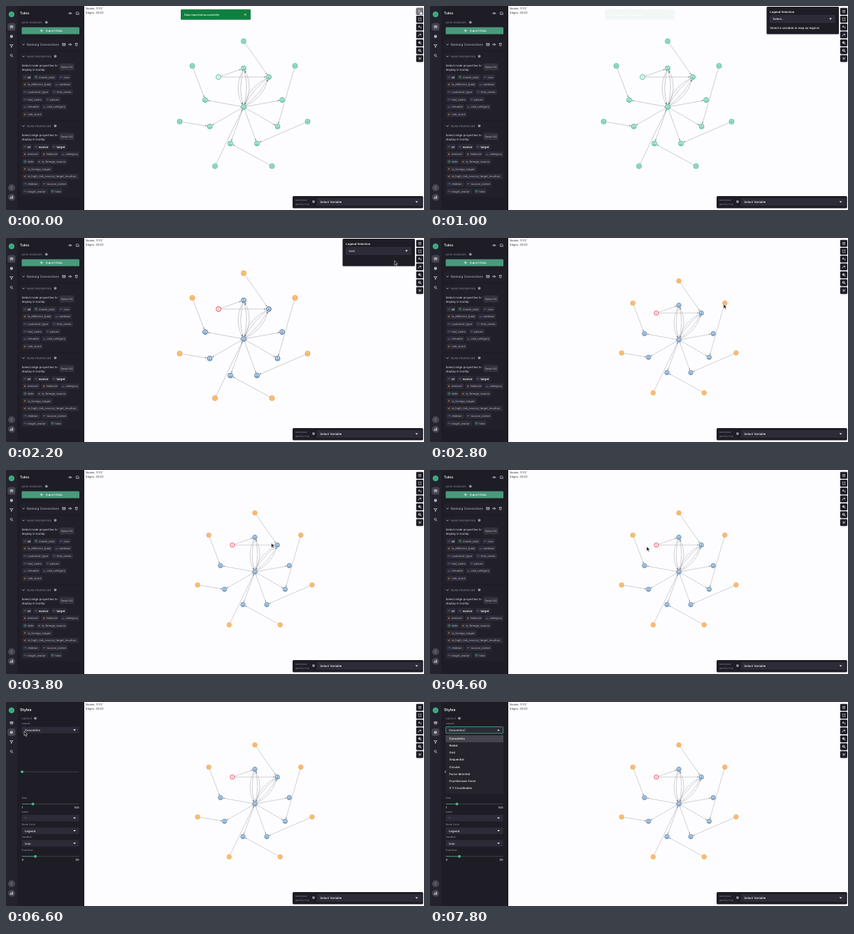
Write an HTML page that moves like this. It is 598x293 px and loops after 8000 ms.

```html
<!DOCTYPE html>
<html lang="en">
<head>
<meta charset="utf-8">
<title>Graph explorer</title>
<style>
html, body { margin: 0; width: 100%; height: 100%; overflow: hidden; background: #fdfdff; }
svg { display: block; width: 100vw; height: 100vh; }
text { font-family: Inter, "Open Sans", sans-serif; font-weight: 500; text-rendering: geometricPrecision; white-space: pre; }
#legendMenu { filter: drop-shadow(0 1px 2px #0006); }
.green { --in: #b3e6d6; --out: #b3e6d6; --red: #f4fcf9; --inS: #56bb9a; --outS: #56bb9a; --redS: #56bb9a; }
.mapped { --in: #b4d0ea; --out: #fcd09a; --red: #fdeef0; --inS: #5a81a8; --outS: #ec9c40; --redS: #e84d62; }
</style>
</head>
<body>
<svg id="stage" viewBox="0 0 598 293" preserveAspectRatio="none"></svg>
<script>
const C = {
  page: '#fdfdff', rail: '#24222c', panel: '#1e1c24', card: '#211f28', field: '#2d2b37', menu: '#25232c',
  hover: '#46444d', line: '#3a3843', tag: '#2d2b36', dim: '#8d8b95', soft: '#c4c2ca',
  white: '#f4f4f6', green: '#4a997d', blue: '#5286d8', orange: '#dd8f3b', clock: '#4bb08a'
};

// Drawing helpers
const rect = (x, y, w, h, fill, r = 1, extra = '') =>
  `<rect x="${x}" y="${y}" width="${w}" height="${h}" rx="${r}" fill="${fill}" ${extra}/>`;
const text = (x, y, s, size = 4.2, fill = C.soft, extra = '') =>
  `<text x="${x}" y="${y + size * 0.36}" font-size="${size}" fill="${fill}" ${extra}>${s}</text>`;
const path = (d, color = C.soft, w = 0.7, extra = '') =>
  `<path d="${d}" fill="none" stroke="${color}" stroke-width="${w}" stroke-linecap="round" stroke-linejoin="round" ${extra}/>`;
const disc = (x, y, r, fill, extra = '') => `<circle cx="${x}" cy="${y}" r="${r}" fill="${fill}" ${extra}/>`;
const group = (id, body, extra = '') => `<g id="${id}" ${extra}>${body}</g>`;
const at = (x, y, body) => `<g transform="translate(${x} ${y})">${body}</g>`;
const bold = 'font-weight="600" style="font-weight:600"';
const chevron = (x, y) => path(`M${x - 1.4} ${y - 0.7}l1.4 1.4 1.4 -1.4`, C.soft, 0.8);
const caret = (x, y, up = 1) => `<path d="M${x - 1.9} ${y - 1 * up}h3.8l-1.9 ${2.1 * up}z" fill="${C.white}"/>`;
const help = (x, y) => disc(x, y, 1.9, '#a3a1ab') + text(x, y, '?', 3, C.panel, 'text-anchor="middle"');
const heading = (x, y, s) => text(x, y, s, 3.5, C.dim, 'letter-spacing=".2"');

// Small icons, centred on 0,0
const icon = {
  data: c => `<ellipse cy="-1.3" rx="2" ry=".9" fill="${c}"/>` + path('M-2-1.2V1.3Q0 2.8 2 1.3V-1.2M-2 .1Q0 1.5 2 .1', c, 0.7),
  palette: c => disc(0, 0, 2.2, c) + disc(-0.9, -0.6, 0.4, C.rail) + disc(0.5, -1, 0.4, C.rail) + disc(1.1, 1.2, 0.7, C.rail),
  funnel: c => path('M-2-1.8H2L.5.1V1.6L-.5 2V.1Z', c, 0.8),
  lens: c => disc(-0.4, -0.4, 1.4, 'none', `stroke="${c}" stroke-width=".8"`) + path('M.7.7L2 2', c, 0.8),
  dots: c => [-1.5, 0, 1.5].map(y => disc(0, y, 0.45, c)).join(''),
  bars: c => path('M-1.4 1.7V.3M0 1.7V-.7M1.4 1.7V-1.7', c, 0.8),
  eye: c => path('M-2.2 0Q0-2.8 2.2 0Q0 2.8-2.2 0Z', c, 0.7) + disc(0, 0, 0.7, c),
  save: c => path('M-1.7-1.7H1L1.8-.9V1.7H-1.7Z', c, 0.7) + disc(0, 0.6, 0.6, c),
  table: c => path('M-1.9-1.6H1.9V1.6H-1.9ZM-1.9-.5H1.9M0-.5V1.6', c, 0.7),
  trash: c => path('M-1.7-1.3H1.7M-.6-1.9H.6M-1.3-1.2L-1 1.9H1L1.3-1.2', c, 0.7),
  list: c => path('M-1.7-1.4H1.7M-1.7 0H1.7M-1.7 1.4H1.7', c, 0.6),
  expand: c => path('M-1.8-.7V-1.8H-.7M.7-1.8H1.8V-.7M1.8.7V1.8H.7M-.7 1.8H-1.8V.7', c, 0.7),
  undo: c => path('M-.6-1.8L-1.8-.7-.6.4M-1.8-.7H.6Q1.8-.6 1.8 1.5', c, 0.7),
  redo: c => path('M.6-1.8L1.8-.7.6.4M1.8-.7H-.6Q-1.8-.6-1.8 1.5', c, 0.7),
  zoomIn: c => icon.lens(c) + path('M-1.1-.4H.3M-.4-1.1V.3', c, 0.5),
  zoomOut: c => icon.lens(c) + path('M-1.1-.4H.3', c, 0.5),
  close: c => path('M-1.4-1.4L1.4 1.4M1.4-1.4L-1.4 1.4', c, 0.9)
};
const put = (name, x, y, c = C.soft) => at(x, y, icon[name](c));

// Property tags: kind, label, width
const mark = {
  s: (x, y) => text(x, y, 'abc', 2.4, C.blue, bold),
  d: (x, y) => disc(x + 2, y, 1.5, 'none', `stroke="${C.clock}" stroke-width=".6"`) + path(`M${x + 2} ${y - 0.8}v.8h.6`, C.clock, 0.4),
  n: (x, y) => text(x + 0.8, y, '#', 3.6, C.orange, bold)
};
const tags = (top, rows, lit) => rows.map((row, i) => {
  let x = 23.3;
  const y = top + i * 10.65;
  return row.split(' ').map(item => {
    const [kind, label, w] = item.split(':');
    const on = lit.includes(label);
    const out = rect(x, y - 4, +w, 8, C.tag, 1.2) + mark[kind](x + 2, y) +
      text(x + 7.8, y, label, 4.1, on ? C.white : '#a3a1ac', on ? bold : '');
    x += +w + 2.2;
    return out;
  }).join('');
}).join('');

const properties = (y, kind, rows, lit) =>
  rect(20, y - 7, 87.5, kind == 'node' ? 98 : 109, C.card, 1.5) +
  chevron(25, y) + heading(30, y, kind.toUpperCase() + ' PROPERTIES') + help(70.5, y - 0.5) +
  text(22.5, y + 12.7, `Select ${kind} properties to`, 4.25, C.soft) +
  text(22.5, y + 19.3, 'display in tooltip', 4.25, C.soft) +
  rect(76.5, y + 10, 21, 10, '#34323c', 1.2) + text(78.5, y + 15, 'Select All', 3.8, '#aaa8b2') +
  tags(y + 29.6, rows, lit);

const sourcesPane = () =>
  text(20, 10.3, 'Tulno', 5, C.white, bold) + put('eye', 92, 10.5) + put('save', 102.5, 10.5) +
  heading(22.5, 23.5, 'DATA SOURCES') + help(57.8, 23.3) +
  rect(22.5, 30.4, 82.5, 10.2, C.green, 1.2) + path('M49 35.4h3.6M50.8 33.6v3.6', C.white, 0.7) +
  text(57, 35.4, 'Import Data', 4.2, C.white) +
  rect(20, 47, 87.5, 16.5, C.card, 1.5) + chevron(25, 55.5) + text(30, 55.3, 'Banking Connections', 4.5, '#aaa8b2') +
  put('table', 83, 55.3) + put('eye', 92, 55.3) + put('trash', 100.7, 55.3) +
  properties(72.6, 'node', [
    's:id:13.5 d:create_date:33.5 s:icon:18', 'n:is_different_bank:43 s:address:26',
    's:customer_type:39.5 s:first_name:31', 's:last_name:30 s:phone:23',
    's:remarks:25.5 s:risk_category:36', 'n:risk_score:29'], 'id') +
  properties(172.6, 'edge', [
    's:id:13.5 s:source:23.5 s:target:22', 'n:amount:25 n:balance:25 s:category:27',
    'd:date:18 n:is_foreign_source:44', 'n:is_foreign_target:43.5',
    'n:is_high_risk_source_target_location:81', 's:relation:25.5 s:source_owner:37',
    's:target_owner:37 d:time:18'], ['id', 'source', 'target']);

const field = (y, label, value) =>
  text(22.5, y - 9.2, label, 3.6, C.dim) + rect(22.5, y - 4.7, 82.3, 9.4, C.field, 1) +
  text(27, y, value, 4.2, C.white) + caret(98, y);
const slider = (y, label, pos, lo, hi) =>
  text(22.5, y - 9.2, label, 3.6, C.dim) + path(`M23 ${y}H104`, '#4b4954', 0.8) + path(`M23 ${y}H${pos}`, C.green, 0.9) +
  disc(pos, y, 2, C.clock) + text(22.5, y + 4.8, lo, 4, C.white) + text(104.5, y + 4.8, hi, 4, C.white, 'text-anchor="end"');

const menu = (x, y, w, h, names, first, hot) =>
  rect(x, y, w, h, C.menu, 1.2) +
  rect(x, first + hot * 10.05 - 5, w, 10, C.hover, 0) +
  names.map((s, i) => text(x + 5, first + i * 10.05, s, 4.2, C.white, i == hot && x < 100 ? bold : '')).join('');

const stylesPane = () =>
  text(20, 11.5, 'Styles', 5.5, C.white, bold) + heading(22.5, 23.5, 'LAYOUT') + help(42, 23.3) +
  field(40.3, 'Layout', 'Concentric') + slider(100.3, '', 23, '', '') +
  slider(146.5, 'Size', 38.5, 1, 100) + field(166.7, 'Label', '-') + field(185, 'Node Color', 'Legend') +
  field(203, 'Variable', 'Icon') + slider(221.7, 'Font Size', 42, 0, 50) +
  group('layoutMenu',
    rect(22.7, 35.6, 82, 9.4, C.field, 1, `stroke="${C.clock}" stroke-width=".8"`) +
    text(27, 40.3, 'Concentric', 4.2, C.white) + path('M50 38.2v4.2', C.soft, 0.4) + caret(98, 40.3, -1) +
    menu(22.5, 47.3, 82.5, 85, ['Concentric', 'Radial', 'Grid', 'Sequential', 'Circular', 'Force-directed',
      'Fruchterman-force', 'X Y Coordinates'], 52.8, 0));

// Graph
const nodes = {
  hub: [340, 145], a: [340, 89.5], b: [376, 102], r: [304, 102], n1: [285, 135], n2: [395, 135],
  n3: [291.5, 173], n4: [388.5, 173], n5: [321, 197.5], n6: [359, 197.5], o0: [340, 50.5], o1: [266.5, 86],
  o2: [413.5, 86], o3: [248.5, 166], o4: [431.5, 166], o5: [299, 230], o6: [380.5, 230]
};
const links = `r-b r-a hub-n1 hub-n2 hub-n3 hub-n4 hub-n5 hub-n6 o0-b o1-n1 o2-n4 o3-n3 o4-n6 o5-hub o6-n5
  a-hub:15 a-hub:8 hub-a:15 hub-a:8 b-hub:13 b-hub:6 hub-b:13 hub-b:6`;

function edge(def) {
  const [ends, bend = 0] = def.split(':');
  const [p, q] = ends.split('-').map(k => nodes[k]);
  const len = Math.hypot(q[0] - p[0], q[1] - p[1]);
  const u = [(q[0] - p[0]) / len, (q[1] - p[1]) / len];
  const ctl = [(p[0] + q[0]) / 2 - u[1] * bend, (p[1] + q[1]) / 2 + u[0] * bend];
  const ang = Math.atan2(q[1] - ctl[1], q[0] - ctl[0]);
  const tip = [q[0] - 4.2 * Math.cos(ang), q[1] - 4.2 * Math.sin(ang)];
  return path(`M${p}Q${ctl} ${tip}`, '#8f8f95', 0.45) +
    `<path d="M0 0L-2.3-.9V.9Z" fill="#75757b" transform="translate(${tip}) rotate(${ang * 180 / Math.PI})"/>`;
}

function node(key) {
  const kind = key == 'r' ? 'red' : key[0] == 'o' ? 'out' : 'in';
  const ink = `var(--${kind}S)`;
  const sign = {
    out: path('M-1.7-.7L0-1.7 1.7-.7ZM-1.1-.3V1.2M0-.3V1.2M1.1-.3V1.2M-1.7 1.5H1.7', '', 0.4),
    in: path('M-1.6 1.6Q0-.6 1.6 1.6ZM0-1.7v1.2', '', 0.6),
    red: path('M0-1.2V.2M0 1.1v.1', '', 0.6)
  }[kind].replace('stroke=""', `style="stroke:${ink}"`);
  const spikes = key == 'hub' ? path('M-4.8 0H4.8M-2.5-4L2.5 4M2.5-4L-2.5 4', '#75757b', 0.5) : '';
  return at(...nodes[key], spikes + `<circle r="3.5" style="fill:var(--${kind});stroke:${ink}" stroke-width="1"/>` + sign);
}

const tools = ['list', 'expand', 'undo', 'redo', 'zoomIn', 'zoomOut', 'close'];
const toolbar = tools.map((name, i) => {
  const y = 7.8 + i * 11.27;
  return rect(586.8, y - 5, 10.2, 10, C.panel, 1.3) + put(name, 592, y, C.white);
}).join('');

const legend =
  rect(481.5, 1, 103.5, 39.5, C.panel, 1.5) + text(486.3, 8.5, 'Legend Selection', 4.2, C.white, bold) +
  rect(486.5, 13.7, 92.5, 10, C.field, 1, `id="legendField" stroke-width=".8"`) +
  `<text id="legendValue" x="490.5" y="20.2" font-size="4.2" fill="${C.white}"></text>` +
  group('caretDown', caret(573, 18.6)) + group('caretUp', caret(573, 18.6, -1)) +
  group('legendHint', text(486.3, 31, 'Select a variable to map as legend', 4.3, C.white));

const legendMenu =
  menu(486.3, 24.5, 92.5, 98.5, ['id', 'create_date', 'icon', 'is_different_bank', 'address', 'customer_type',
    'first_name', 'last_name', 'phone', 'remarks'], 31, 2) +
  rect(577.6, 25, 1.2, 77, '#77757f', 0.6);

const toast = rect(250, 4.8, 100, 15, '#0f7f3f', 1.2) + text(255, 12.3, 'Data imported successfully', 3.85, '#fff') +
  at(342.3, 12.3, `<g transform="scale(.75)">${icon.close('#fff')}</g>`);

const inspector =
  rect(410, 273, 186.7, 17.4, C.panel, 1.5) +
  ['VARIABLE', 'INSPECTOR'].map((s, i) => text(413.7, 279 + i * 5.4, s, 3.1, C.dim, 'letter-spacing=".35"')).join('') +
  help(440, 281) + rect(444.5, 276, 150, 11, C.field, 1) + text(449.3, 281.5, 'Select Variable', 4.35, C.white) + caret(587.5, 281.5);

const rail =
  rect(0, 0, 16, 293, C.rail, 0) + disc(8, 12, 4.2, '#3aa980') +
  group('active', rect(2.5, -5.5, 11, 11, '#45434d', 3)) +
  ['data', 'palette', 'funnel', 'lens'].map((name, i) => put(name, 8, 30 + i * 13.7)).join('') +
  ['dots', 'bars'].map((name, i) => disc(8, 261 + i * 13.7, 5, '#484650') + put(name, 8, 261 + i * 13.7, C.white)).join('');

const pointers =
  group('arrow', `<path d="M0 0V6.4L1.6 5 2.7 7.4 3.7 6.9 2.6 4.6H4.7Z" fill="#16161a" stroke="#fff" stroke-width=".5"/>`) +
  group('hand', `<path d="M-.6 0Q0-.7.6 0V2.6L2.8 3.2Q3.3 3.5 3.1 4.4L2.5 6.8H-.9L-2.6 4.2Q-2.3 3.3-.6 4.4Z" fill="#fff" stroke="#222" stroke-width=".5"/>`);

document.getElementById('stage').innerHTML =
  rect(0, 0, 598, 293, C.page, 0) + rect(16, 0, 96, 293, C.panel, 0) + rail +
  group('sources', sourcesPane()) + group('styles', stylesPane()) +
  text(114, 4, 'Nodes: 17/17', 4, '#55555b') + text(114, 9.6, 'Edges: 23/23', 4, '#55555b') +
  group('graph', links.split(/\s+/).map(edge).join('') + Object.keys(nodes).map(node).join('')) +
  group('toast', toast) + toolbar + group('toolHover', rect(586.8, 2.8, 10.2, 10, '#77757f', 1.3) + put('list', 592, 7.8, C.white)) +
  inspector + group('legend', legend) + group('legendMenu', legendMenu) + group('pointer', pointers);

// Pointer stops: time, x, y
const stops = [
  [0, 593, 6], [400, 593, 6], [800, 578, 14], [1400, 545, 18], [1800, 531.5, 49], [2000, 531.5, 49],
  [2400, 580, 16], [2600, 592, 8], [2800, 420, 95], [3200, 420, 95], [3400, 495, 112], [3800, 379.5, 105],
  [4400, 312, 128], [4600, 310, 110], [5000, 437, 140], [5200, 437, 140], [5600, 0, 7],
  [5800, 6, 30], [6000, 8, 42], [6400, 9, 43], [7000, 60, 40], [8000, 60, 40]
];
const $ = id => document.getElementById(id);
const show = (id, on) => { $(id).style.display = on ? '' : 'none'; };
const within = (t, a, b) => t >= a && t < b;

function pointerAt(t) {
  const i = Math.max(1, stops.findIndex(s => s[0] > t));
  const [p, q] = [stops[i - 1], stops[i]];
  const k = (t - p[0]) / (q[0] - p[0]);
  return [p[1] + (q[1] - p[1]) * k, p[2] + (q[2] - p[2]) * k];
}

function draw(t) {
  const styled = t >= 6000, mapped = t >= 2200, zoomed = t >= 2600;
  const picking = within(t, 1600, 2200);
  const hand = t < 600 || picking || within(t, 5800, 6600);
  show('sources', !styled);
  show('styles', styled);
  show('layoutMenu', t >= 7400);
  show('legend', within(t, 400, 2600));
  show('legendMenu', picking);
  show('caretUp', picking);
  show('caretDown', !picking);
  show('legendHint', !mapped);
  show('toolHover', t < 600);
  show('arrow', !hand);
  show('hand', hand);
  show('pointer', !within(t, 800, 1400) && t < 7200);
  $('legendValue').textContent = mapped ? 'icon' : 'Select...';
  $('legendField').setAttribute('stroke', picking ? C.clock : C.line);
  $('active').setAttribute('transform', `translate(0 ${styled ? 43.5 : 30})`);
  $('graph').setAttribute('class', mapped ? 'mapped' : 'green');
  $('graph').setAttribute('transform', zoomed ? 'translate(356 146.3) scale(.895) translate(-340 -145)' : '');
  $('toast').setAttribute('opacity', t < 800 ? 1 : t < 1000 ? 0.5 : t < 1200 ? 0.04 : 0);
  $('pointer').setAttribute('transform', `translate(${pointerAt(t)})`);
}

const LOOP = 8000, STEP = 200;
const start = performance.now();
function tick() {
  const t = (performance.now() - start) % LOOP;
  draw(Math.floor(t / STEP) * STEP);
  requestAnimationFrame(tick);
}
tick();
</script>
</body>
</html>
```
